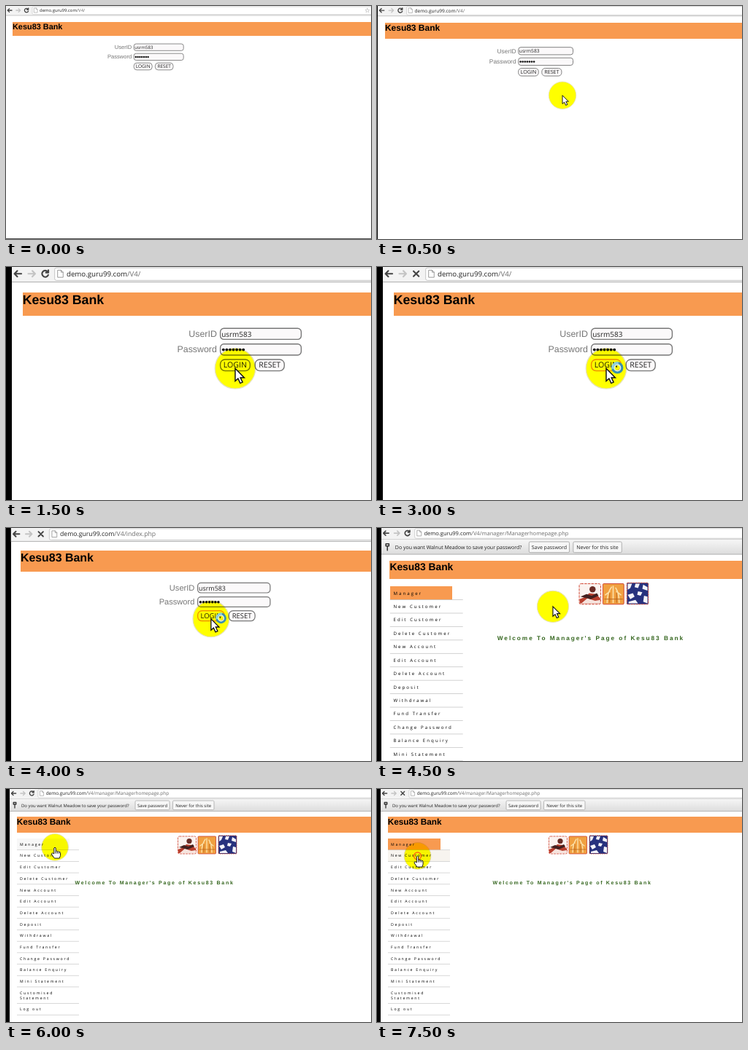
Animation, 500 px wide and 320 px high, one loop 8 s. Source, as an HTML page:

```html
<!DOCTYPE html>
<html lang="en">
<head>
<meta charset="utf-8">
<title>Bank login demo</title>
<style>
html, body { margin: 0; width: 100%; height: 100%; overflow: hidden; background: #fff; }
svg { display: block; width: 500px; height: 320px; text-rendering: geometricPrecision; }
text { font-family: "Open Sans", "Noto Sans", sans-serif; }
.arial { font-family: "Liberation Sans", Arial, sans-serif; }
.crisp, .orange { shape-rendering: crispEdges; }
.orange { fill: #f89a50; }
.label { font-size: 7.6px; fill: #777; text-anchor: end; }
.field { fill: #fbf9fa; stroke: #777; stroke-width: .85; }
.btn { font-size: 6.5px; fill: #222; text-anchor: middle; }
.bar { font-size: 5.95px; fill: #222; }
.menu { font-size: 5.2px; letter-spacing: 1.75px; fill: #000; }
.glow { mix-blend-mode: multiply; }
.line { fill: none; stroke-linecap: round; stroke-linejoin: round; }
</style>
</head>
<body>
<svg viewBox="0 0 500 320">
<defs>
  <linearGradient id="info" x2="0" y2="1"><stop stop-color="#f6f6f6"/><stop offset="1" stop-color="#dcdcdc"/></linearGradient>
</defs>
<g id="world">
  <rect class="crisp" x="-20" y="-5" width="20" height="340"/>
  <rect y="319" width="500" height="1" fill="#555"/>

  <!-- browser toolbar -->
  <rect y="-2" width="500" height="15" fill="#f3f3f3"/>
  <rect y="12.6" width="500" height=".7" fill="#b4b4b4"/>
  <rect x="36" y="1" width="470" height="10.6" rx="1.5" fill="#fff" stroke="#c4c4c4" stroke-width=".6"/>
  <g class="line" stroke-width="1.3">
    <path d="M8 6H2.4M4.6 3.6L2.2 6L4.6 8.4" stroke="#444"/>
    <path d="M13.8 6H19.4M17.2 3.6L19.6 6L17.2 8.4" stroke="#c4c4c4"/>
    <path id="reload" d="M30.1 4.2A2.7 2.7 0 1 0 30.6 7M30.7 3V5H28.6" stroke="#444"/>
    <path id="stop" d="M25.8 3.8L30.2 8.2M30.2 3.8L25.8 8.2" stroke="#444"/>
    <path d="M38.7 3H41.4L43.1 4.7V9H38.7ZM41.4 3V4.7H43.1" stroke="#999" stroke-width=".6"/>
    <path d="M495 3.2L495.8 5.2L498 5.3L496.3 6.6L496.9 8.7L495 7.5L493.1 8.7L493.7 6.6L492 5.3L494.2 5.2Z" stroke="#aaa" stroke-width=".5"/>
  </g>
  <text x="46" y="8.2" font-size="5.95" fill="#222">demo.guru99.com<tspan id="path" fill="#6c6c6c"></tspan></text>

  <g id="banner">
    <rect class="orange" x="9" y="21.5" width="495" height="19.8"/>
    <text class="arial" x="9" y="31.6" font-size="10.9" font-weight="700">Kesu83 Bank</text>
  </g>

  <g id="login">
    <text class="arial label" x="172.3" y="59.2">UserID</text>
    <text class="arial label" x="172.3" y="72.4">Password</text>
    <rect class="field" x="175.2" y="52" width="68" height="9.3" rx="3"/>
    <rect class="field" x="175.2" y="65.2" width="68" height="9.3" rx="3"/>
    <text x="176.2" y="59" font-size="6.1" fill="#222">usrm583</text>
    <g id="dots" fill="#111"></g>
    <rect id="submit" class="field" x="175.2" y="78.2" width="25" height="9.6" rx="4"/>
    <rect class="field" x="204.4" y="78.2" width="24.6" height="9.6" rx="4"/>
    <text class="btn" x="187.7" y="85.2">LOGIN</text>
    <text class="btn" x="216.7" y="85.2">RESET</text>
  </g>

  <g id="manager" transform="scale(.9259) translate(-5 .5)">
    <rect x="5" y="13.6" width="500" height="17" fill="url(#info)"/>
    <rect x="5" y="30.2" width="500" height=".8" fill="#aaa"/>
    <path class="line" d="M12 22V26M10.2 18.5H13.8V21H10.2Z" stroke="#333" stroke-width="1.3"/>
    <text class="bar" x="21" y="24.6">Do you want Walnut Meadow to save your password?</text>
    <g fill="#f7f7f7" stroke="#aaa" stroke-width=".8">
      <rect x="177" y="16" width="47" height="12.6" rx="1.5"/>
      <rect x="228.5" y="16" width="56.5" height="12.6" rx="1.5"/>
    </g>
    <text class="bar" x="200.5" y="24.6" text-anchor="middle">Save password</text>
    <text class="bar" x="256.7" y="24.6" text-anchor="middle">Never for this site</text>

    <rect id="first" class="orange" x="15" y="68" width="72.5" height="15.7"/>
    <rect id="second" x="15" y="84" width="85" height="15.2" fill="#f7f4ef"/>
    <g id="menu"></g>

    <!-- three small pictures -->
    <g stroke="#d0402c" stroke-width=".8">
      <rect x="235.5" y="65" width="25" height="24" rx="2" fill="#fbf3f0" stroke-dasharray="3 1"/>
      <rect x="263" y="65" width="24.5" height="24" rx="1" fill="#f0a040"/>
      <rect x="291" y="64" width="25" height="25" rx="1" fill="#27327e" stroke-dasharray="2 1"/>
    </g>
    <path d="M236 88V83L243 80L247 76L255 77L260 82V88Z" fill="#b8402f"/>
    <path d="M238 88L245 82L254 85L260 84V88Z" fill="#f6e4de"/>
    <path d="M237 80L244 77L250 79L256 76L258 79L249 83Z" fill="#43201f"/>
    <circle cx="251" cy="71.5" r="3.6" fill="#6a2c26"/>
    <path class="line" d="M268 87Q268 76 273 69M275 87V68M282 87Q282 76 278 70M266 78L271 74M284 78L279 74" stroke="#fbe0a8" stroke-width="1.4"/>
    <path class="line" d="M265 83H286M271 87V76M279 87V76" stroke="#b8651c" stroke-width=".8"/>
    <path d="M292 65H297L295 70L292 72ZM301 65H306L304 70L300 69ZM310 66L315 69V73L309 71ZM292 78L298 76L300 80L295 83ZM304 74L309 75L307 79L303 78ZM311 79L315 80V88L310 86ZM293 86L301 84L304 88H293Z" fill="#f4f4fa"/>

    <text id="marquee" class="arial" y="131" font-size="7" font-weight="700" letter-spacing="1.7" fill="#35661f">Welcome To Manager's Page of Kesu83 Bank</text>
  </g>

  <g id="cursor">
    <circle class="glow" r="17" fill="#ff0" stroke="#e6e2b4" stroke-width=".8"/>
    <circle id="ring" r="4.6" fill="none" stroke="#ff6a10" stroke-width="1.3"/>
    <g id="spinner" class="line" transform="translate(9.4 -.6)" stroke-width="2">
      <circle r="4" stroke="#3a8fae"/>
      <circle r="2.6" stroke="#d8eef2" stroke-width="1"/>
      <path d="M-4 0A4 4 0 0 1 0 -4" stroke="#8fd0dc"/>
    </g>
    <path id="arrow" d="M0 0V10.6L2.4 8.5L4.2 12.4L6.2 11.5L4.4 7.7H7.6Z" fill="#fff" stroke="#111" stroke-width=".9"/>
    <path id="hand" d="M-1.1 8.4V1Q0 -.6 1.1 1V5Q2.4 4.3 3.2 5.4Q4.6 4.7 5.2 6Q6.8 5.5 7 7V10.5L5.8 14H-.6L-4 9.2Q-4.6 7.4 -3 7.3ZM1.1 5V8M3.2 5.6V8M5.2 6.2V8" fill="#fff" stroke="#111" stroke-width=".9"/>
  </g>
</g>
</svg>
<script>
const $ = id => document.getElementById(id);
const show = (id, on) => $(id).style.display = on ? "" : "none";
const move = (id, x, y) => $(id).setAttribute("transform", `translate(${x} ${y})`);

$("dots").innerHTML = Array.from({length: 7}, (_, i) =>
  `<circle cx="${177.8 + i * 2.8}" cy="70" r="1.2"/>`).join("");

const items = ["Manager", "New Customer", "Edit Customer", "Delete Customer", "New Account",
  "Edit Account", "Delete Account", "Deposit", "Withdrawal", "Fund Transfer", "Change Password",
  "Balance Enquiry", "Mini Statement", "Customised|Statement", "Log out"];
let itemY = 68;
$("menu").innerHTML = items.map(item => {
  const rows = item.split("|");
  const text = rows.map((row, i) =>
    `<text class="menu" x="19" y="${itemY + 9.8 + i * 7}">${row}</text>`).join("");
  itemY += 15.68 + (rows.length - 1) * 7;
  return text + `<rect x="15" y="${itemY - .3}" width="85" height=".7" fill="#c8c8c8"/>`;
}).join("");

// Each step holds until the next one; settings carry over.
const steps = [
  {t: 0, s: 1, x: 0, y: 0, path: "/V4/", cursor: ""},
  {t: 500, s: 1.1, x: 1, y: -.5, cursor: "arrow", at: [230, 112]},
  {t: 1000, s: 1.4, x: 4.8, at: [217.1, 98.2]},
  {t: 1500, s: 1.63, x: 8, at: [187.7, 85.8]},
  {t: 2500, busy: true, focus: true, ring: true},
  {t: 3000, ring: false, spin: true},
  {t: 4000, s: 1.46, x: 6.8, path: "/V4/index.php"},
  {t: 4500, s: 1.27, x: 6, path: "/V4/manager/Managerhomepage.php", home: true,
   busy: false, spin: false, at: [185, 85.3], text: 140, over: 0},
  {t: 5000, s: 1.08, x: 5, at: [183.3, 84.7], text: 125},
  {t: 5500, at: [125, 87], text: 109.5},
  {t: 6000, cursor: "hand", at: [57.4, 74.5], text: 94.5, over: 1},
  {t: 6500, at: [46.8, 85.6], text: 100, over: 2},
  {t: 7000, text: 115},
  {t: 7500, text: 158.5, busy: true, ring: true}
];

function draw(now) {
  const t = now % 8000;
  const v = Object.assign({}, ...steps.filter(step => step.t <= t));
  $("world").setAttribute("transform", `translate(${v.x} ${v.y}) scale(${v.s})`);
  $("path").textContent = v.path;
  show("reload", !v.busy);
  show("stop", v.busy);
  show("login", !v.home);
  show("manager", v.home);
  move("banner", 0, v.home ? 14.6 : 0);
  $("submit").style.stroke = v.focus ? "#f08a3c" : "";
  $("first").style.fill = v.over === 1 ? "#f7f7f7" : "";
  show("second", v.over === 2);
  $("marquee").setAttribute("x", v.text || 0);
  show("cursor", v.cursor);
  if (v.at) move("cursor", ...v.at);
  show("arrow", v.cursor === "arrow");
  show("hand", v.cursor === "hand");
  show("ring", v.ring);
  show("spinner", v.spin);
}

const start = performance.now();
(function tick() {
  draw(performance.now() - start);
  requestAnimationFrame(tick);
})();
</script>
</body>
</html>
```
